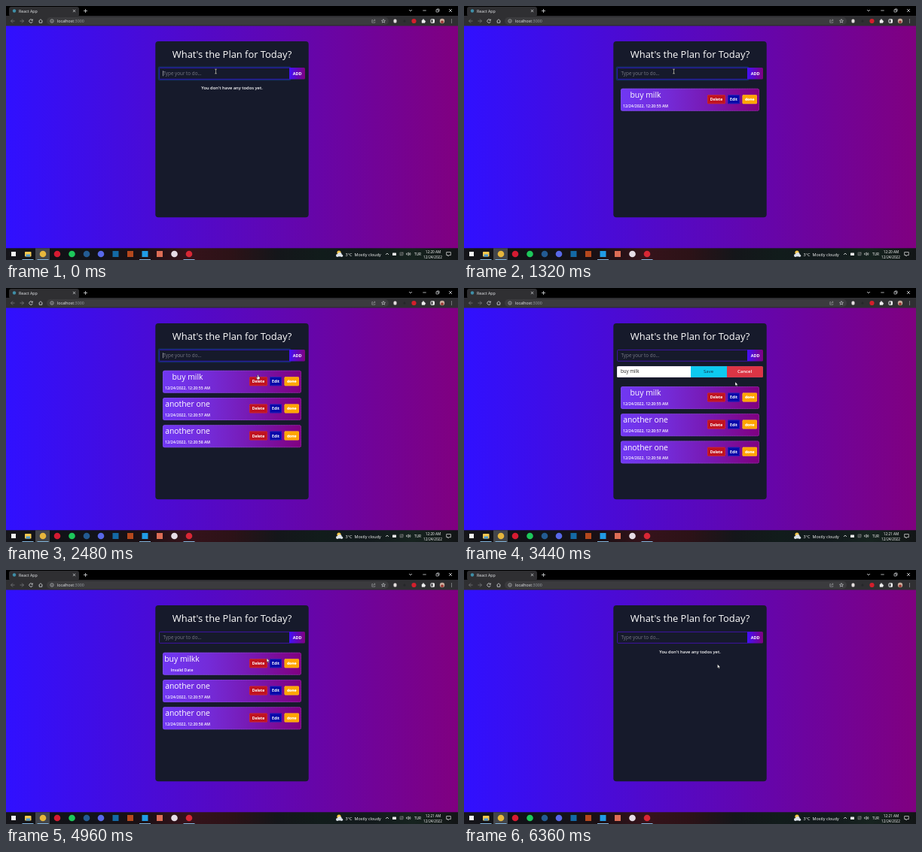
Recreate the animation shown at these times as an HTML page with a canvas. Size 600x338 px, loop 6400 ms.

```html
<!DOCTYPE html>
<html lang="en">
<head>
<meta charset="utf-8">
<title>Todo app</title>
<style>
html, body { margin: 0; width: 600px; height: 338px; overflow: hidden; background: #000; }
canvas { display: block; }
</style>
</head>
<body>
<canvas id="stage" width="600" height="338"></canvas>
<script>
const g = document.getElementById('stage').getContext('2d');
const LOOP = 6400;
const PAGE_TOP = 26.6, PAGE_END = 322.3;
const FOCUS_RING = 'rgba(13, 110, 253, 0.25)';
const ADD = [1140, 1700, 1980], DELETE = [5640, 5900, 6180];
const EDIT = 2860, FOCUS = 4020, EXTRA = 4300, SAVE = 4840, TOGGLE = 5260, MINUTE = 2600;

// time, x, y, shape (i = text beam, a = arrow, h = hand)
const POINTER = [
  [0, 278, 87, 'i'], [2060, 278, 87, 'i'], [2160, 290, 98, 'a'], [2440, 333, 116, 'h'],
  [2520, 334, 117, 'h'], [2800, 357, 125, 'h'], [2860, 357, 125, 'a'], [3400, 360, 125, 'a'],
  [3660, 360, 125, 'a'], [3900, 292, 114, 'i'], [4000, 287, 114, 'i'], [4480, 287, 114, 'i'],
  [4620, 304, 113, 'h'], [4760, 325, 112, 'h'], [4840, 325, 112, 'a'], [5120, 374, 125, 'h'],
  [5260, 376, 125, 'h'], [5460, 332, 127, 'h'], [6180, 332, 127, 'a'], [6340, 336.5, 125.5, 'a'],
  [LOOP, 336.5, 125.5, 'a']
];

function box(x, y, w, h, fill, r = 0) {
  g.fillStyle = fill;
  g.beginPath();
  g.roundRect(x, y, w, h, r);
  g.fill();
}

function frame(x, y, w, h, color, r = 0, dash = [], width = 1) {
  g.strokeStyle = color;
  g.lineWidth = width;
  g.setLineDash(dash);
  g.beginPath();
  g.roundRect(x, y, w, h, r);
  g.stroke();
  g.setLineDash([]);
}

function dot(x, y, r, fill) {
  g.fillStyle = fill;
  g.beginPath();
  g.arc(x, y, r, 0, 7);
  g.fill();
}

function path(d, x, y, color, width = 0.8, fill) {
  const p = new Path2D(d);
  g.save();
  g.translate(x, y);
  if (fill) { g.fillStyle = fill; g.fill(p); }
  g.strokeStyle = color;
  g.lineWidth = width;
  g.stroke(p);
  g.restore();
}

function text(s, x, y, size, color = '#fff', weight = 400, align = 'left') {
  g.font = `${weight} ${size}px "Open Sans", "Noto Sans", sans-serif`;
  g.textAlign = align;
  g.fillStyle = color;
  g.fillText(s, x, y);
  return g.measureText(s).width;
}

function across(x, w, ...colors) {
  const grad = g.createLinearGradient(x, 0, x + w, 0);
  colors.forEach((c, i) => grad.addColorStop(i / (colors.length - 1), c));
  return grad;
}

function drawBrowser() {
  box(0, 0, 600, 13, '#000');
  box(4, 1, 93, 13, '#2f2f32', 3);
  box(0, 13, 600, PAGE_TOP - 13, '#2f2f32');
  dot(11, 6.5, 2.2, '#3f8fa8');
  text('React App', 17, 8.6, 5.3, '#e8eaed');
  const icon = '#d5d7da';
  path('M-1.6-1.6L1.6 1.6M1.6-1.6L-1.6 1.6', 90.5, 6.5, icon);
  path('M-2.5 0H2.5M0-2.5V2.5', 105.5, 6.5, icon);
  path('M-2-1L0 1L2-1', 537, 6, icon);
  path('M-2.2 0H2.2', 555.5, 6, icon);
  path('M-2-1H1V2H-2ZM-1-1V-2H2V1H1', 573, 6, icon, 0.7);
  path('M-2-2L2 2M2-2L-2 2', 590, 6, icon);

  path('M2.5 0H-2.5M0-2.5L-2.5 0L0 2.5', 9, 20, '#77797c');
  path('M-2.5 0H2.5M0-2.5L2.5 0L0 2.5', 21, 20, '#77797c');
  path('M1.8-1.5A2.3 2.3 0 1 0 2.3 .7M2.3-2.5V-.8H.5', 33, 20, icon);
  path('M-2.4 0L0-2.3L2.4 0M-1.8-.5V2.3H1.8V-.5', 46, 20, icon);
  box(54, 15, 454, 10, '#3b3b3e', 5);
  path('M2.2 0A2.2 2.2 0 1 1-2.2 0A2.2 2.2 0 1 1 2.2 0M0-.3V1.2M0-1.2V-.8', 61, 20, icon, 0.6);
  const w = text('localhost', 68, 22, 5.3, '#e8eaed');
  text(':3000', 68 + w, 22, 5.3, '#9aa0a6');
  path('M-1-1.5H-2.2V2.2H1.8V.8M-1 1C-.8-1 .5-1.2 2-1.2M.8-2.4L2.2-1.2L.8 0', 488, 20, '#a5a6a8', 0.6);
  path('M0-2.5L.7-.8L2.5-.7L1.1.5L1.6 2.2L0 1.2L-1.6 2.2L-1.1.5L-2.5-.7L-.7-.8Z', 501, 20, icon, 0.6);
  box(514.5, 17.5, 4, 5, '#e4dede', 1.5);
  dot(529, 20, 1.5, '#252629');
  dot(541.5, 20, 3.1, '#d41f2c');
  path('M-2-1H-.8V-2.3H.8V-1H2V.2H2.8V1.2H2V2.4H-2Z', 554, 20, '#eee', 0.4, '#eee');
  frame(564, 17.8, 4.5, 4.5, '#eee', 0.5);
  box(566.5, 17.8, 2, 4.5, '#eee');
  dot(579, 20, 3.2, '#c9a99a');
  dot(579, 21.2, 1.8, '#9c3431');
  for (const y of [18, 20, 22]) dot(591.5, y, 0.55, icon);
}

function drawTaskbar(t) {
  box(0, PAGE_END, 600, 16, across(0, 600, '#15151a', '#111216', '#12131a', '#1b1014', '#36131b', '#2c1217', '#14161a', '#111c1b', '#12191c', '#16231f', '#121516'));
  box(39, PAGE_END, 19, 16, '#43464b');
  box(7, 327, 6, 6, '#f2f2f2');
  box(25, 327, 8.5, 6.5, '#f4c84f', 0.8);
  box(26.5, 330.5, 5.5, 3, '#4d9ad3');
  const discs = [[49, '#e6b63c'], [68, '#d51b32'], [87.5, '#1dc85b'], [107, '#235b92'], [126, '#5868e8'], [223.5, '#e6dce6'], [243, '#d82735']];
  for (const [x, c] of discs) dot(x, 330, 4.3, c);
  const squares = [[145.5, '#1469a5'], [165, '#b5481d'], [184.5, '#219be5'], [204, '#dd6d55']];
  for (const [x, c] of squares) box(x - 4, 326, 8, 8, c);
  for (const x of [29, 49, 184.5, 243]) box(x - 7.5, 337, 15, 1, '#82b5dc');

  dot(442, 328, 2.6, '#f6c849');
  for (const [x, y, r] of [[440, 332, 2], [443, 330.7, 2.7], [445.5, 332.3, 1.7]]) dot(x, y, r, '#dce3ea');
  text('3°C', 450.5, 332.5, 5.5);
  text('Mostly cloudy', 462.5, 332.5, 5.5);
  path('M-2 1L0-1L2 1', 506, 330, '#eee');
  box(513, 328.5, 5, 3.5, '#eee', 0.5);
  frame(523, 328, 4, 3.8, '#999', 0, [], 0.5);
  path('M-2 1.8A4 4 0 0 1 2-2M-.4 2A2 2 0 0 1 2-.2', 525.5, 330, '#888', 0.6);
  path('M-2.5-.8H-1L.5-2V2L-1 .8H-2.5ZM1.4-1A1.5 1.5 0 0 1 1.4 1M2.3-1.9A3 3 0 0 1 2.3 1.9', 534, 330, '#ddd', 0.6);
  text('TUR', 546.5, 332, 4.8, '#fff', 400, 'center');
  text(t < MINUTE ? '12:20 AM' : '12:21 AM', 567, 328.5, 4.7, '#fff', 400, 'center');
  text('12/24/2022', 566.5, 335.6, 4.7, '#fff', 400, 'center');
  path('M-2.8-2.4H2.8V1.6H.8L-.6 3V1.6H-2.8Z', 587.5, 330, '#eee', 0.7);
}

// Text in the upper field while a todo is being typed
function typed(t) {
  const jobs = [['buy milk', 360, ADD[0]], ['another one', 1380, ADD[1]], ['another one', 1740, ADD[2]]];
  const job = jobs.find(([, from, to]) => t >= from && t < to);
  if (!job) return '';
  const [s, from, to] = job;
  return s.slice(0, Math.ceil((t - from) / (to - from - 60) * s.length));
}

function caret(x, y, color, on) {
  if (on) box(x, y, 0.5, 7, color);
}

function drawInput(t) {
  const focused = t < EDIT, value = typed(t), blink = t % 340 < 170;
  if (focused) frame(202.5, 81.3, 175.2, 17.1, FOCUS_RING, 1.5, [], 1.6);
  frame(203.6, 82.4, 173, 14.9, focused ? '#3415d8' : '#4c12ce', 1, [], 0.75);
  box(376, 82, 21, 15.6, across(376, 21, '#4410f8', '#800080'), [0, 1.5, 1.5, 0]);
  text('ADD', 386.6, 92.1, 5.5, '#fff', 700, 'center');
  const w = text(value || 'Type your to do...', 208.5, 92, 6.3, value ? '#fff' : '#777985');
  caret(value ? 209 + w : 208, 86.3, '#fff', focused && (value || blink));
}

function drawEditor(t) {
  const focused = t >= FOCUS, value = t < EXTRA ? 'buy milk' : 'buy milkk';
  if (focused) frame(202.3, 103.3, 99.4, 16.4, FOCUS_RING, 1.5, [], 1.6);
  box(203, 104, 98, 15, '#fff', [1.5, 0, 0, 1.5]);
  box(301, 104, 48, 15, '#0dcaf0');
  box(349, 104, 48, 15, '#dc3545', [0, 1.5, 1.5, 0]);
  frame(203.4, 104.4, 193.2, 14.2, '#8b55b066', 1.5, [1, 1], 0.7);
  text('Save', 324.5, 113.3, 6, '#16304a', 400, 'center');
  text('Cancel', 372.5, 113.3, 6, '#fff', 600, 'center');
  const w = text(value, 208, 113.3, 6.2, '#222');
  if (!focused) return;
  frame(203.3, 104.3, 97.4, 14.4, '#86b7fe', [1.5, 0, 0, 1.5], [], 0.6);
  box(220.2, 114.6, w - 12.2, 0.6, '#8b5560');
  caret(208.3 + w, 107.6, '#111', t % 340 < 170);
}

function button(label, x, y, w, color, edge) {
  box(x, y, w, 12, color, 1.3);
  frame(x + 0.4, y + 0.4, w - 0.8, 11.2, edge, 1.3, [1, 1], 0.7);
  text(label, x + w / 2, y + 7.9, 5.1, '#fff', 700, 'center');
}

function drawRow(i, y, t) {
  const edited = i === 0 && t >= SAVE, undone = i === 0 && t >= TOGGLE;
  const title = i ? 'another one' : edited ? 'buy milkk' : 'buy milk';
  const date = edited ? 'Invalid Date' : `12/24/2022, 12:20:5${[5, 7, 8][i]} AM`;
  const mid = edited ? 233.5 : 241, shift = undone ? 6 : 0;
  box(208, y, 184, 30, across(208, 184, '#7038f4', '#742bd8', '#7817ae', '#800080'), 2.5);
  frame(208.4, y + 0.4, 183.2, 29.2, '#a77be088', 2.5, [1.2, 1], 0.8);
  text(title, mid, y + 12.2, 10.4, '#fff', 500, 'center');
  text(date, mid, y + 25, 5.15, '#fff', 600, 'center');
  button('Delete', 323 - shift, y + 8.4, 24, '#c0121f', '#d64a58');
  button('Edit', 350 - shift, y + 8.4, 16, '#0707a9', '#5552d0');
  button(undone ? 'undone' : 'done', 369.5 - shift, y + 8.4, 19.5 + shift, '#ffa500', '#ffc04d');
  box(373 - shift, y + 14.5, 12.5 + shift, 0.5, '#fff');
}

function drawPointer(t) {
  const n = POINTER.findIndex(k => k[0] > t);
  const [t0, x0, y0, shape] = POINTER[n - 1], [t1, x1, y1] = POINTER[n];
  const u = (t - t0) / (t1 - t0);
  const x = x0 + (x1 - x0) * u, y = y0 + (y1 - y0) * u;
  if (shape === 'i') {
    g.globalCompositeOperation = 'difference';
    path('M-1.3-2.8H1.3M0-2.8V2.8M-1.3 2.8H1.3', x + 0.5, y, '#ddd', 0.7);
    g.globalCompositeOperation = 'source-over';
  } else if (shape === 'h') {
    path('M-.7-2.2Q0-3 .6-2.2V-.2L2.5.4V2.2L1.6 3.8H-.9L-2.3 1.2L-1.6.6L-.7 1.3Z', x + 1, y + 1.5, '#222', 0.5, '#fff');
  } else {
    path('M0 0V5L1.2 4L2 5.8L2.8 5.4L2.1 3.7H3.6Z', x, y, '#222', 0.4, '#fff');
  }
}

function draw(t) {
  box(0, 26, 600, 297, across(0, 600, '#3010ff', '#800080'));
  box(198.3, 46.9, 203.4, 234.4, '#161a2b', 4);
  text("What's the Plan for Today?", 300, 69, 12.9, '#fff', 500, 'center');
  drawInput(t);

  const editing = t >= EDIT && t < SAVE;
  if (editing) drawEditor(t);
  const rows = [0, 1, 2].filter(i => t >= ADD[i] && t < DELETE[i]);
  rows.forEach((i, n) => drawRow(i, (editing ? 131 : 109.8) + n * 36.2, t));
  if (!rows.length) text("You don't have any todos yet.", 300, 110.5, 5.75, '#fff', 600, 'center');

  drawBrowser();
  drawTaskbar(t);
  drawPointer(t);
}

const start = performance.now();
function tick() {
  draw((performance.now() - start) % LOOP);
  requestAnimationFrame(tick);
}
tick();
</script>
</body>
</html>
```
